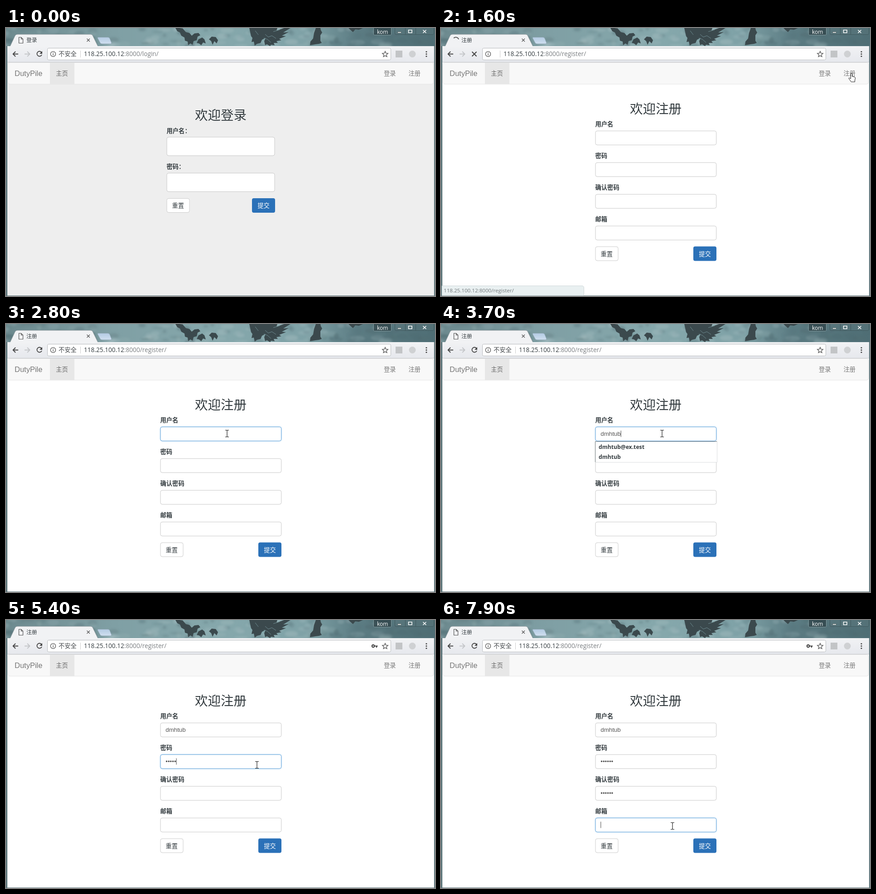
An HTML page for the animation above (8000 ms loop, 947 px wide and 592 px high).

```html
<!DOCTYPE html>
<html lang="zh-CN">
<head>
<meta charset="utf-8">
<style>
html, body { margin: 0; width: 100%; height: 100%; overflow: hidden; background: #fff; }
svg { display: block; }
text { font-family: "Open Sans", "Noto Sans CJK SC", "Noto Sans CJK", sans-serif; }
.arial { font-family: "Liberation Sans", "Noto Sans CJK SC", sans-serif; }
.bold { font-weight: 700; }
.mid { text-anchor: middle; }
.focus { filter: drop-shadow(0 0 1.6px rgba(102, 175, 233, .5)); }
</style>
</head>
<body>
<svg width="947" height="592" viewBox="0 0 947 592">
  <defs>
    <linearGradient id="sky">
      <stop offset="0" stop-color="#6d8a8f"/><stop offset=".25" stop-color="#7f9fa4"/>
      <stop offset=".5" stop-color="#86a8ac"/><stop offset=".7" stop-color="#7fa2a7"/>
      <stop offset=".82" stop-color="#5c7c83"/><stop offset="1" stop-color="#4f6e75"/>
    </linearGradient>
    <linearGradient id="bar" x2="0" y2="1">
      <stop offset="0" stop-color="#f1f2f4"/><stop offset="1" stop-color="#e6e8ed"/>
    </linearGradient>
    <linearGradient id="plus" x2="0" y2="1">
      <stop offset="0" stop-color="#b3cbe2"/><stop offset="1" stop-color="#d0dff0"/>
    </linearGradient>
    <filter id="soft"><feGaussianBlur stdDeviation="2.2"/></filter>
    <clipPath id="top"><path d="M0 0H947V40H0z"/></clipPath>
  </defs>
  <path d="M0 0H947V592H0z" fill="#647d82"/>
  <g clip-path="url(#top)">
    <path d="M0 0H947V40H0z" fill="url(#sky)"/>
    <g id="clouds" filter="url(#soft)"></g>
    <g fill="#3b494d">
      <path d="M374 0l4 7 6 3 3 7 7 4 1 7 6 2 1 8 5-4 5 3 2-8 7-2 2-8 6-3-4-5-9 1-6 5-5-6-8-2-7-8-7-1z"/>
      <path d="M421 33l4-8 8-4 5 4 3 9-6-2-4 6-5-4z"/>
      <path d="M448 25l6-6 9 1 5 7-3 7-5-5-4 8-3-8z"/>
      <path d="M537 0h62l-2 6 17-6h14l-16 10 12-1-15 8 9 1-15 6 5 3-11 2 3 4-9 0 2 5-8-1-2 3-7-4-4 2-2-9 3-7-8 4-3 7-8 2-5 4-2-9-5 1 2-9-3-4z"/>
      <path d="M684 0h10l1 5 3 5-4 6 0 12 3 5-6 2-8 1-12 2 1-8 6-7 2-12z"/>
      <path d="M756 0h32l-9 4-8-1-5 6-6-5z"/>
    </g>
    <path d="M572 14l7 6 8-3 9 6M569 22l8 3 8 7M550 6l7 9M590 8l14-4" fill="none" stroke="#6d8a8f"/>
  </g>
  <path d="M2.5 40V591.5H945.5V40" fill="none" stroke="#586f74"/>
  <g id="view"></g>
</svg>
<script>
const LOOP = 8000, GREY = '#777', INK = '#333b3f';
const NAME = 'dmhtub', MAIL = NAME + '@ex.test', HOST = '118.25.100.12';
const view = document.getElementById('view');
const ruler = document.createElement('canvas').getContext('2d');

const text = (x, y, s, size, fill = INK, cls = '') =>
  `<text x="${x}" y="${y}" font-size="${size}" fill="${fill}" class="${cls}">${s}</text>`;
const rect = (x, y, w, h, fill, stroke = 'none', r = 0, cls = '') =>
  `<rect x="${x}" y="${y}" width="${w}" height="${h}" rx="${r}" fill="${fill}" stroke="${stroke}" class="${cls}"/>`;
const line = (d, stroke, w = 1, fill = 'none') =>
  `<path d="${d}" fill="${fill}" stroke="${stroke}" stroke-width="${w}"/>`;
const circle = (x, y, r, fill, stroke = 'none', w = 1) =>
  `<circle cx="${x}" cy="${y}" r="${r}" fill="${fill}" stroke="${stroke}" stroke-width="${w}"/>`;

// Soft mottled backdrop behind the tab strip
let seed = 7;
const rnd = () => (seed = seed * 16807 % 2147483647) / 2147483647;
let clouds = '';
for (let i = 0; i < 150; i++) {
  const x = rnd() * 947, light = rnd() > (x > 700 ? .75 : .4);
  clouds += `<ellipse cx="${x}" cy="${rnd() * 42}" rx="${4 + rnd() * 12}" ry="${2 + rnd() * 5}"
    fill="${light ? '#a3bcbf' : '#4f6c72'}" opacity="${.15 + rnd() * .3}"/>`;
}
document.getElementById('clouds').innerHTML = clouds;

// Pointer stops: time, x, y
const stops = [[200, 950, 250], [750, 906, 100], [1750, 906, 100], [2150, 488, 242],
  [4000, 488, 242], [4450, 554, 320], [5750, 554, 320], [6200, 524, 379],
  [7150, 524, 379], [7450, 511, 455]];
const fields = [
  { label: '用户名', focus: 2200, start: 3000, step: 120 },
  { label: '密码', focus: 4500, start: 4700, step: 170 },
  { label: '确认密码', focus: 6250, start: 6450, step: 130 },
  { label: '邮箱', focus: 7500, start: Infinity, step: 1 }
];

function pointerAt(t) {
  const i = stops.findIndex(s => s[0] > t);
  if (i === 0) return null;
  if (i < 0) return stops[stops.length - 1].slice(1);
  const [a, x, y] = stops[i - 1], [b, u, v] = stops[i];
  const k = (t - a) / (b - a), e = k * k * (3 - 2 * k);
  return [x + (u - x) * e, y + (v - y) * e];
}

function pointer(p, register) {
  if (!p) return '';
  const [x, y] = p;
  let shape;
  if (x > 875 && x < 929 && y > 77 && y < 124)
    shape = line('M-1.5 1Q0-1 1.5 1V7l5 1q2.2.6 2 3l-1 5v3h-8l-5-7q-1-2 1-2l3 2z', '#222', 1, '#fff');
  else if (register && x > 341 && x < 608 && y > 227 && y < 469 && (y - 227) % 70 < 32)
    shape = line('M-4-7.5h3l1 1 1-1h3M0-7V7M-4 7.5h3l1-1 1 1h3', '#222', 1.2);
  else
    shape = line('M0 0V16l4-4 3 7 2.5-1-3-7H12z', '#222', 1, '#fff');
  return `<g transform="translate(${x.toFixed(1)} ${y.toFixed(1)})">${shape}</g>`;
}

function chrome(t, loading, path) {
  const moved = path !== 'login', urlX = loading ? 138 : 172;
  let s = line('M9 40.5L20 17Q21.5 14 25 14H187Q190 14 191.5 17L203 40.5', '#8d999d', 1, '#f1f2f4')
    + line('M203 20.5H225Q228 20.5 229 23L233 33Q233 35 231 35H212Q209 35 208 33L202 22z', '#91a8b5', 1, 'url(#plus)')
    + rect(3, 40, 942, 36, 'url(#bar)') + line('M3 75.5H945', '#c6c8cc')
    + text(45, 31, moved ? '注册' : '登录', 11.8)
    + line('M178.5 23.5l6.5 6.5m0-6.5l-6.5 6.5', '#555', 1.3);

  if (loading) {
    s += `<g transform="rotate(${(t - 1600) * .36} 33 27)">${line('M28 22.5A6.5 6.5 0 0 1 39 25', '#555', 1.8)}</g>`
      + line('M68.5 52.5l10 10m0-10l-10 10', '#444', 2);
  } else {
    s += line('M28.5 20.5h5l4 4v9h-9zM33.5 20.5v4h4', '#555', 1.2)
      + line('M78.5 54A5.5 5.5 0 1 0 79 59', '#444', 1.8)
      + '<path d="M80 51v6h-6z" fill="#444"/>';
  }
  s += line('M27 57.5H15.5m5.5-5.5l-5.5 5.5 5.5 5.5', '#444', 1.8)
    + line('M41 57.5H52.5m-5.5-5.5l5.5 5.5-5.5 5.5', '#c3c5c8', 1.8)
    + rect(91.5, 44.5, 758, 26, '#fff', '#b7babd', 3)
    + circle(104, 57.5, 5.6, 'none', '#555', 1.3) + line('M104 56.5v4M104 54v1.4', '#555', 1.4)
    + (loading ? '' : text(116, 62, '不安全', 13.3, '#484c4f'))
    + line(`M${urlX - 7.5} 50v15`, '#ccc')
    + text(urlX, 62, `${HOST}<tspan fill="#7b7f82">:8000/${path}/</tspan>`, 13.65)
    + line('M837 51.5l1.8 4.2 4.5.4-3.4 3 1 4.4-3.9-2.4-3.9 2.4 1-4.4-3.4-3 4.5-.4z', '#555', 1.3)
    + rect(860, 50, 15, 15, '#c2c4c6') + circle(897, 57.5, 7.5, '#cfd1d3');
  for (const y of [52.5, 57.5, 62.5]) s += circle(928, y, 1.6, '#444');
  if (t >= 4700) s += circle(810.5, 57.5, 2.6, 'none', '#444', 2.2) + line('M813 57.5h7.5M818 57.5v3.5', '#444', 2.2);

  // Window controls
  return s + rect(811.5, -3, 39, 18.5, 'rgba(45,65,70,.75)', '#819a9e', 2)
    + text(819, 13, 'kom', 12, '#fff')
    + rect(858.5, -3, 86, 17.5, 'rgba(90,118,124,.5)', '#40595e', 3)
    + line('M881.5 0V14M904.5 0V14', '#40595e')
    + rect(864.5, 8.5, 8, 2.5, '#fff', '#566')
    + line('M888.5 4.5h7.5v6h-7.5z', '#fff', 1.6)
    + line('M920.5 4.5l7 6.5m0-6.5l-7 6.5', '#fff', 1.7);
}

function buttons(left, right, y) {
  return rect(left + .5, y + .5, 50, 31, '#fff', '#ccc', 4)
    + text(left + 25.3, y + 21, '重置', 13.3, INK, 'mid')
    + rect(right - 51, y, 51, 32, '#2b71b8', 'none', 4)
    + text(right - 25.5, y + 21, '提交', 13.3, '#fff', 'mid');
}

function loginPage() {
  return text(474, 203, '欢迎登录', 28.5, INK, 'mid')
    + text(354.5, 231.5, '用户名：', 13.3, INK, 'bold') + rect(355, 241, 238, 41, '#fff', '#c8c8c8', 4)
    + text(354.5, 310.5, '密码：', 13.3, INK, 'bold') + rect(355, 320.5, 238, 41, '#fff', '#c8c8c8', 4)
    + buttons(354.5, 594, 376);
}

function registerPage(t) {
  let s = text(474, 188.5, '欢迎注册', 28.5, INK, 'mid');
  fields.forEach((f, i) => {
    const y = 70 * i, next = fields[i + 1];
    const focused = t >= f.focus && (!next || t < next.focus);
    const count = Math.max(0, Math.min(6, Math.floor((t - f.start) / f.step) + 1));
    const value = i ? '•'.repeat(count) : NAME.slice(0, count);
    s += text(340.5, 217 + y, f.label, 13.3, INK, 'bold')
      + rect(341, 227.3 + y, 266.7, 31, '#fff', focused ? '#5c9fd8' : '#c8c8c8', 4, focused ? 'focus' : '')
      + text(352.3, 247 + y, value, 13.3, '#555', 'arial');
    const last = count ? f.start + (count - 1) * f.step : f.focus;
    if (focused && (t - last) % 1000 < 500) {
      ruler.font = '13.3px "Liberation Sans", sans-serif';
      const x = 352.8 + ruler.measureText(value).width;
      s += line(`M${x.toFixed(1)} ${235.5 + y}v14`, '#444');
    }
  });
  s += buttons(340.5, 608, 482.5);
  if (t >= 3000 && t < 4450)
    s += rect(340, 259, 269, 46.5, '#fff') + line('M609.5 259V305.5H340', '#dcdfe0')
      + line('M340.5 305V259.5H609', '#687175')
      + text(348, 275.5, MAIL, 12.2, INK, 'bold') + text(348, 298, NAME, 12.2, INK, 'bold');
  return s;
}

function scene(t) {
  const loading = t >= 1200 && t < 1900, register = t >= 1500;
  const path = t >= 1200 ? 'register' : 'login';
  const p = pointerAt(t);
  let s = chrome(t, loading, path)
    + rect(3, 76, 942, 515, register ? '#fff' : '#eee')
    + rect(4.5, 76.5, 939, 47.5, '#f8f8f8', '#e4e4e4', 4)
    + rect(97, 77, 54, 47, '#e7e7e7')
    + text(19, 106, 'DutyPile', 16.5, GREY, 'arial')
    + text(110.3, 105, '主页', 13.3, '#666')
    + text(834, 105, '登录', 13.3, GREY) + text(888.5, 105, '注册', 13.3, GREY)
    + (register ? registerPage(t) : loginPage());
  if (t >= 750 && t < 1850)
    s += line('M2 569.5H311Q315.5 569.5 315.5 574V591H2', '#d0d8da', 1, '#e9f0f1')
      + text(6, 584, HOST + ':8000/register/', 11.6, '#72797c');
  return s + pointer(p, register);
}

let shown = '';
function draw() {
  const next = scene(performance.now() % LOOP);
  if (next !== shown) view.innerHTML = shown = next;
  requestAnimationFrame(draw);
}
draw();
</script>
</body>
</html>
```
